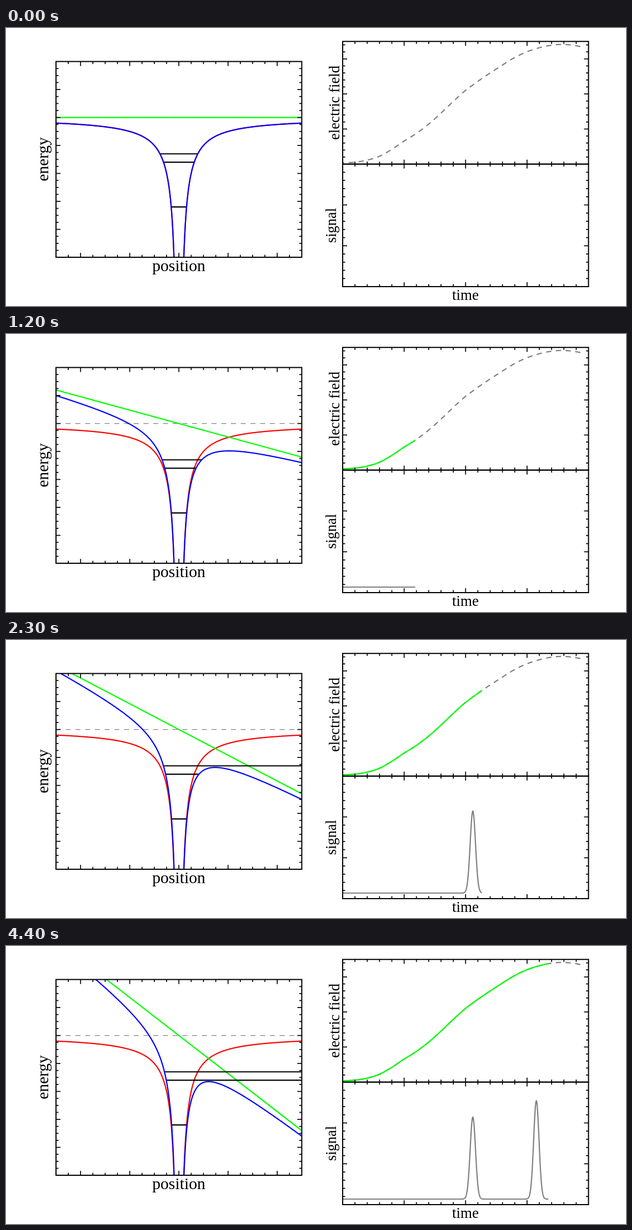
Animation of 1116 by 502 pixels, one loop 5500 ms. Source, as an HTML page with a canvas:

```html
<!DOCTYPE html>
<html>
<head>
<meta charset="utf-8">
<style>
html, body { margin: 0; width: 100%; height: 100%; overflow: hidden; background: #fff; }
canvas { display: block; }
</style>
</head>
<body>
<canvas id="stage" width="1116" height="502"></canvas>
<script>
const ctx = document.getElementById('stage').getContext('2d');

const GRAY = '#808080', GREEN = '#00ff00', RED = '#ff0000', BLUE = '#0000ff';
const WELL = { x: 90, y: 60.6, w: 442.4, h: 353.5 };
const FIELD = { x: 606, y: 24.2, w: 442.5, h: 221.5 };
const SIGNAL = { x: 606, y: 245.7, w: 442.5, h: 221.4 };
const UNIT_X = 44.24, UNIT_Y = 50.5, MID_X = 311.2, ZERO_Y = 161.6;
const LEVELS = [1.3, 1.6, 3.2];
const STEP = 10.89;   // time axis pixels per step

// Heights of the field curve at every second step
const FIELD_Y = [243.3, 242.3, 238.7, 232, 220, 205.3, 191.7, 175.5, 156.3, 135.5, 115.5,
  99, 84, 69.8, 56, 45, 37.2, 32, 29.7, 31, 34.5];

function stroke(color, width, dash = [], offset = 0) {
  ctx.strokeStyle = color;
  ctx.lineWidth = width;
  ctx.setLineDash(dash);
  ctx.lineDashOffset = offset;
  ctx.stroke();
}

function line(x1, y1, x2, y2, ...style) {
  ctx.beginPath();
  ctx.moveTo(x1, y1);
  ctx.lineTo(x2, y2);
  stroke(...style);
}

function plot(fn, from, to, ...style) {
  ctx.beginPath();
  const n = Math.ceil((to - from) * 3);
  for (let i = 0; i <= n; i++) {
    const x = from + (to - from) * i / n;
    ctx.lineTo(x, fn(x));
  }
  stroke(...style);
}

function clipped(box, draw) {
  ctx.save();
  ctx.beginPath();
  ctx.rect(box.x, box.y, box.w, box.h);
  ctx.clip();
  draw();
  ctx.restore();
}

// Catmull-Rom curve through the field heights
function fieldY(x) {
  const u = (x - FIELD.x) / STEP / 2, last = FIELD_Y.length - 1;
  const i = Math.min(Math.floor(u), last - 1), t = u - i;
  const at = j => FIELD_Y[Math.max(0, Math.min(last, j))];
  const [a, b, c, d] = [at(i - 1), at(i), at(i + 1), at(i + 2)];
  return b + t / 2 * (c - a + t * (2 * a - 5 * b + 4 * c - d + t * (3 * (b - c) + d - a)));
}

function signalY(x) {
  const peak = (center, height) => height * Math.exp(-(((x - center) / 4.8) ** 2) / 2);
  return 457 - peak(840.3, 148) - peak(954.6, 177.5);
}

function drawWell(slope) {
  const lineY = x => ZERO_Y + slope * (x - MID_X) / UNIT_X * UNIT_Y;
  const coulomb = x => UNIT_Y * UNIT_X / Math.abs(x - MID_X);
  const right = WELL.x + WELL.w;
  const well = (tilt, color) => {
    const fn = x => (tilt ? lineY(x) : ZERO_Y) + coulomb(x);
    plot(fn, WELL.x, MID_X - 6, color, 2.2);
    plot(fn, MID_X + 6, right, color, 2.2);
  };
  line(WELL.x, ZERO_Y, right, ZERO_Y, GRAY, 1.2, [9, 8.5]);
  well(false, RED);
  line(WELL.x, lineY(WELL.x), right, lineY(right), GREEN, 2.2);
  for (const e of LEVELS) {
    const y = ZERO_Y + e * UNIT_Y, disc = e * e - 4 * slope;
    const a = 2 / (e + Math.sqrt(e * e + 4 * slope));
    const b = disc < 0 ? 5 : 2 / (e + Math.sqrt(disc));
    line(MID_X - a * UNIT_X, y, MID_X + b * UNIT_X, y, '#000', 2.2);
  }
  well(true, BLUE);
}

// Ticks sit on opposite sides; `major` tells which minor index is long
function ticks(box, stepX, majorX, stepY, majorY) {
  const { x, y, w, h } = box, bottom = y + h, right = x + w;
  for (let i = 1; i * stepX < w - 2; i++) {
    const px = x + i * stepX, len = majorX(i) ? 8 : 4.5;
    line(px, y, px, y + len, '#000', 1.7);
    line(px, bottom, px, bottom - len, '#000', 1.7);
  }
  for (let i = 1; i * stepY < h - 2; i++) {
    const py = bottom - i * stepY, len = majorY(i) ? 8 : 4.5;
    line(x, py, x + len, py, '#000', 1.7);
    line(right, py, right - len, py, '#000', 1.7);
  }
  ctx.beginPath();
  ctx.rect(x, y, w, h);
  stroke('#000', 2);
}

function label(text, x, y, size, turned) {
  ctx.save();
  ctx.translate(x, y);
  if (turned) ctx.rotate(-Math.PI / 2);
  ctx.font = size + 'px "Liberation Serif", serif';
  ctx.textAlign = 'center';
  ctx.fillStyle = '#000';
  ctx.fillText(text, 0, 0);
  ctx.restore();
}

function draw(step) {
  const now = FIELD.x + step * STEP;
  ctx.fillStyle = '#fff';
  ctx.fillRect(0, 0, 1116, 502);

  clipped(WELL, () => drawWell(step * 0.02));
  plot(fieldY, FIELD.x, FIELD.x + 40 * STEP, GRAY, 2.2, [9.5, 8], 6.5);
  if (step) {
    plot(fieldY, FIELD.x, now, GREEN, 2.3);
    plot(signalY, SIGNAL.x, now, GRAY, 2.2);
  }

  const every = (n, shift = 0) => i => i % n === shift;
  ticks(WELL, 22.12, every(4, 2), UNIT_Y / 4, every(4));
  ticks(FIELD, 22.125, every(5), 12.66, every(5));
  ticks(SIGNAL, 22.125, every(5), 14.76, every(5));

  label('position', 311, 439, 29.7);
  label('energy', 76, 237, 29.5, true);
  label('time', 827, 491, 27);
  label('electric field', 600, 135, 26.7, true);
  label('signal', 594, 356.5, 26.4, true);
}

// 100 ms per step, with a 1100 ms rest on steps 23 and 34
function stepAt(ms) {
  const n = Math.floor(ms / 100);
  return n < 34 ? Math.min(n, 23) : Math.min(n - 10, 34);
}

function tick(time) {
  draw(stepAt(time % 5500));
  requestAnimationFrame(tick);
}
draw(0);
requestAnimationFrame(tick);
</script>
</body>
</html>
```
